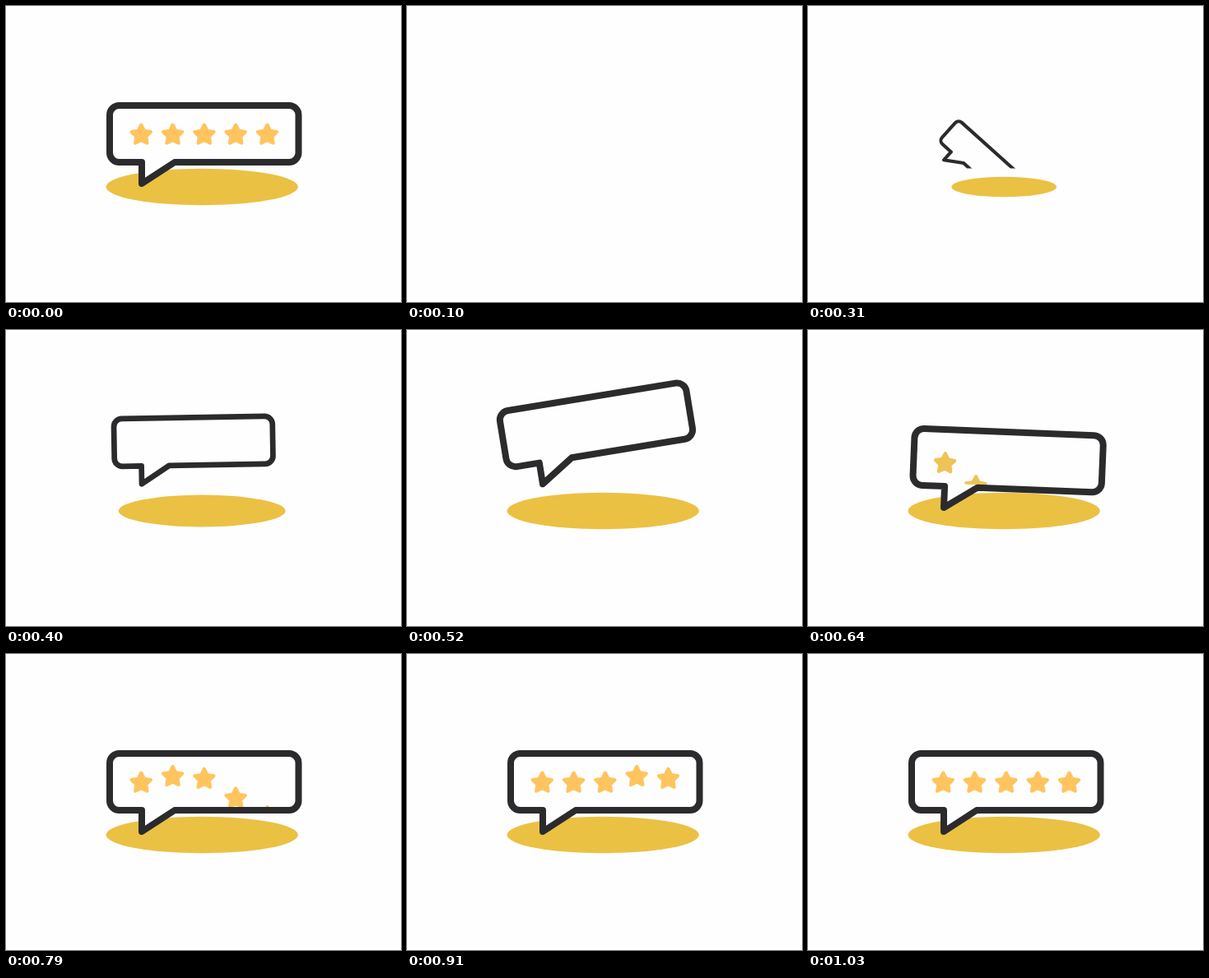
Animation of 480 by 360 pixels, one loop 3.09 s. Source, as an HTML page with a canvas:

```html
<!DOCTYPE html>
<html lang="en">
<head>
<meta charset="utf-8">
<title>Five star review</title>
<style>
html, body { margin: 0; width: 100%; height: 100%; overflow: hidden; background: #fefefe; }
canvas { display: block; }
</style>
</head>
<body>
<canvas id="stage" width="480" height="360"></canvas>
<script>
const ctx = document.getElementById('stage').getContext('2d');
const LOOP = 3090, STEP = 30, START = 220;
const DARK = '#2b2b2d', GOLD = '#ebc144', AMBER = '#ffc45e';
const TIP = { x: 165, y: 216 };

const clamp = v => Math.min(1, Math.max(0, v));
const part = (t, a, b) => clamp((t - a) / (b - a));
const easeOut = (p, n) => 1 - Math.pow(1 - p, n);
const swing = p => (1 - Math.cos(Math.PI * p)) / 2;
const mix = (a, b, p) => a + (b - a) * p;

function bubblePath() {
  const l = 126, r = 355.5, top = 121, b = 190, rad = 11.5;
  const p = new Path2D();
  p.moveTo(TIP.x, TIP.y);
  p.lineTo(205, b);
  p.arcTo(r, b, r, top, rad);
  p.arcTo(r, top, l, top, rad);
  p.arcTo(l, top, l, b, rad);
  p.arcTo(l, b, TIP.x, b, rad);
  p.lineTo(TIP.x, b);
  p.closePath();
  return p;
}

function starPath() {
  const p = new Path2D();
  for (let i = 0; i < 10; i++) {
    const r = i % 2 ? 6.3 : 12.3, a = (i / 5 - 0.5) * Math.PI;
    p.lineTo(r * Math.cos(a), r * Math.sin(a));
  }
  p.closePath();
  return p;
}

const bubble = bubblePath(), star = starPath();

function tilt(t) {
  if (t <= 520) return mix(154, -9.3, easeOut(part(t, START, 520), 3.25));
  if (t <= 630) return mix(-9.3, 2.4, swing(part(t, 520, 630)));
  return mix(2.4, 0, swing(part(t, 630, 720)));
}

// Vertical offset of a star, t counted from its own start
function hop(t) {
  return t < 185
    ? mix(45, -9.5, swing(part(t, 0, 185)))
    : mix(-9.5, 0, swing(part(t, 185, 270)));
}

function drawStars(t) {
  ctx.save();
  ctx.beginPath();
  ctx.rect(126, 121, 230, 65.5);
  ctx.clip();
  ctx.fillStyle = ctx.strokeStyle = t < 670 ? '#efc355' : AMBER;
  ctx.lineWidth = 4;
  for (let i = 0; i < 5; i++) {
    ctx.save();
    ctx.translate(164.3 + i * 38.3, 156.8 + hop(t - 520 - i * 60));
    ctx.fill(star);
    ctx.stroke(star);
    ctx.restore();
  }
  ctx.restore();
}

function drawBubble(t) {
  const size = easeOut(part(t, START, 520), 2);
  ctx.save();
  if (t < 430) {
    ctx.beginPath();
    ctx.rect(0, 0, 480, 197.5);
    ctx.clip();
  }
  ctx.translate(TIP.x, mix(187.3, TIP.y, swing(part(t, 520, 620))));
  ctx.rotate(tilt(t) * Math.PI / 180);
  ctx.scale(size, size);
  ctx.translate(-TIP.x, -TIP.y);
  ctx.fillStyle = '#fefefe';
  ctx.fill(bubble);
  drawStars(t);
  ctx.strokeStyle = DARK;
  ctx.lineWidth = 8;
  ctx.stroke(bubble);
  ctx.restore();
}

function drawFloor(t) {
  const size = easeOut(part(t, START, 520), 2.22);
  ctx.fillStyle = GOLD;
  ctx.beginPath();
  ctx.ellipse(238.2, 220, 116.7 * size, 22.3 * size, 0, 0, Math.PI * 2);
  ctx.fill();
}

function draw(time) {
  let t = time % LOOP;
  ctx.fillStyle = '#fefefe';
  ctx.fillRect(0, 0, 480, 360);
  if (t >= 100 && t < 250) return;
  t = t < 100 ? LOOP : Math.floor((t - 10) / STEP) * STEP + 10;
  drawFloor(t);
  drawBubble(t);
}

ctx.lineJoin = 'round';
const begin = performance.now();
function tick() {
  draw(performance.now() - begin);
  requestAnimationFrame(tick);
}
tick();
</script>
</body>
</html>
```
